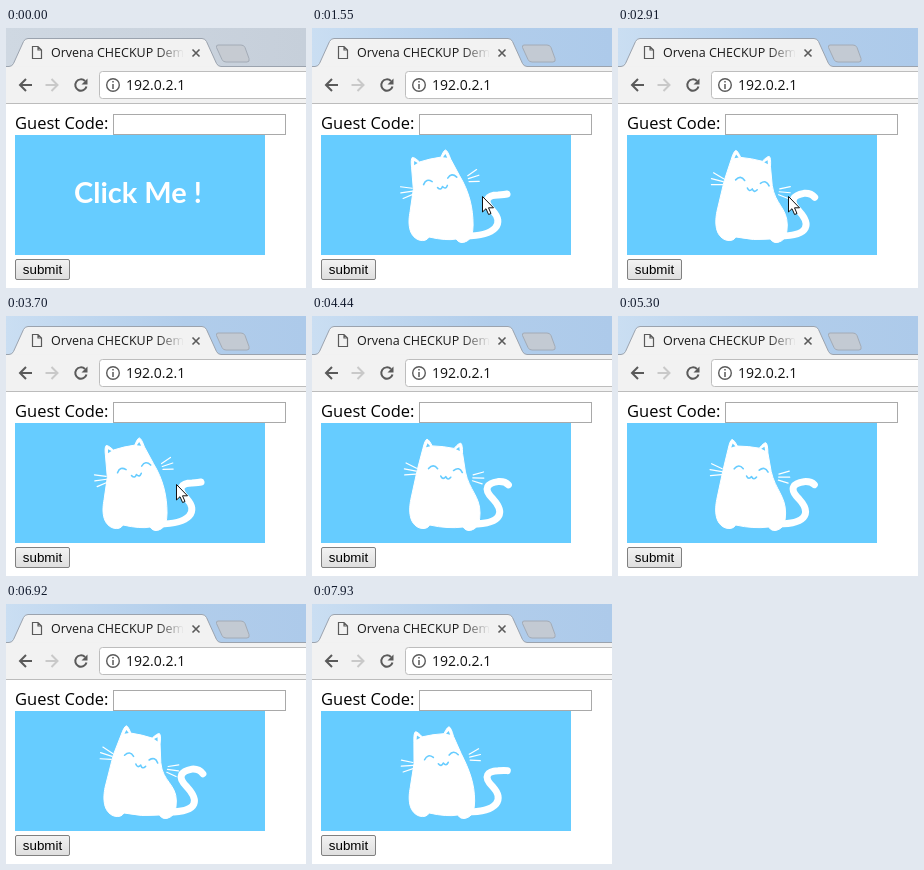
Recreate the animation shown at these times as an HTML page. Size 300x260 px, loop 8000 ms.

```html
<!DOCTYPE html>
<html lang="en">
<head>
<meta charset="utf-8">
<style>
html, body { margin: 0; width: 100%; height: 100%; overflow: hidden; background: #fff; }
svg { display: block; width: 300px; height: 260px; }
text { font-family: "Open Sans", "Noto Sans", sans-serif; }
.icon { fill: none; stroke: #5a5a5a; stroke-width: 2; }
</style>
</head>
<body>
<svg viewBox="0 0 300 260">
  <defs>
    <linearGradient id="idle"><stop stop-color="#cfd8e2"/><stop offset="1" stop-color="#c6cfda"/></linearGradient>
    <linearGradient id="active"><stop stop-color="#cadef2"/><stop offset=".6" stop-color="#b1cdeb"/><stop offset="1" stop-color="#adcaea"/></linearGradient>
    <linearGradient id="fade" gradientUnits="userSpaceOnUse" x1="150" x2="178">
      <stop stop-color="#1a1a1a"/><stop offset="1" stop-color="#1a1a1a" stop-opacity="0"/>
    </linearGradient>
    <linearGradient id="button" x2="0" y2="1">
      <stop stop-color="#f3f3f3"/><stop offset="1" stop-color="#dedede"/>
    </linearGradient>
  </defs>

  <!-- browser window -->
  <rect id="strip" width="300" height="39"/>
  <path id="plus" d="M212 17H235Q238 17 239 19.500L243 30.500Q244 34 241 34H220Q217 34 216 31.500L210.500 19.500Q210 17 212 17Z" stroke="#a3abb6"/>
  <rect y="38" width="300" height="38" fill="#f2f2f2"/>
  <path d="M0 38.500H3Q6 38.500 7.500 35.500L17.500 13.500Q19 10.500 22 10.500H196Q199 10.500 200.500 13.500L210.500 35.500Q212 38.500 215 38.500H300" fill="#f2f2f2" stroke="#9ba3ae"/>
  <path d="M0 75.500H300" stroke="#bcbcbc"/>
  <path class="icon" style="stroke-width:1.2" d="M26.500 18.500H32L35.500 22V30.500H26.500ZM32 18.500V22H35.500"/>
  <text x="45" y="29" font-size="12.500" fill="url(#fade)">Orvena CHECKUP Demo</text>
  <path class="icon" style="stroke-width:1.6" d="M186.500 21.500L193.500 28.500M193.500 21.500L186.500 28.500"/>
  <path class="icon" d="M26 57H14M20 51L14 57L20 63"/>
  <path class="icon" style="stroke:#c9c9c9" d="M39.500 57H51.500M45.500 51L51.500 57L45.500 63"/>
  <path class="icon" d="M79 53A5.700 5.700 0 1 0 80.500 58.500"/>
  <path d="M81.500 50.500V56.500H75.500Z" fill="#5a5a5a"/>
  <rect x="93.500" y="43.500" width="220" height="27" rx="3" fill="#fff" stroke="#bdbdbd"/>
  <circle class="icon" style="stroke-width:1.4" cx="107" cy="57" r="6.300"/>
  <path class="icon" style="stroke-width:1.5" d="M107 53V54.600M107 56V61"/>
  <text x="120" y="62" font-size="14" fill="#111">192.0.2.1</text>

  <!-- page -->
  <text x="9" y="101" font-size="16.500">Guest Code:</text>
  <rect x="107.500" y="86.500" width="172" height="20" fill="#fff" stroke="#a9a9a9"/>
  <rect x="9" y="107" width="250" height="120" fill="#6cf"/>
  <text id="prompt" x="132" y="175" text-anchor="middle" fill="#fff" style="font:bold 29px Lato,sans-serif">Click Me !</text>
  <g id="cat" fill="none" stroke-linecap="round" stroke-linejoin="round">
    <path id="tail" stroke="#fff" stroke-width="7"/>
    <path id="body" fill="#fff" stroke="#fff"/>
    <g id="face">
      <path stroke="#fff" stroke-width="1.200" d="M-24 2L-35 -2M-24 5L-36 4M-24 8L-35 10M33 2L43 -2M33 5L44 4M33 8L43 10"/>
      <path stroke="#6cf" stroke-width="1.600" d="M-12 1Q-8 -5 -3 0M13 0Q18 -5 22 1M1 7Q3.500 11 6 7Q8.500 11 11 7"/>
      <path fill="#6cf" d="M-16 -24L-17 -20L-13 -21.500ZM16 -24L17 -20L13 -21.500Z"/>
    </g>
  </g>
  <rect x="9.500" y="231.500" width="54" height="20" rx="1.500" fill="url(#button)" stroke="#808080"/>
  <text x="36.500" y="246" text-anchor="middle" style="font:13.333px 'Liberation Sans',Arial,sans-serif">submit</text>
  <path id="cursor" d="M.500 .500V16L4 12.700L6.600 18.500L9 17.500L6.500 11.800H11.500Z" fill="#fff" stroke="#111"/>
</svg>
<script>
const LOOP = 8000, CLICK = 1200, SWAY = 2250, LEFTMOST = 1480;
const $ = id => document.getElementById(id);
const clamp = v => Math.max(0, Math.min(1, v));
const mix = (a, b, k) => a + (b - a) * k;

// lean runs from -1 (left) to 1 (right)
function drawCat(lean) {
  const cx = 127 + 4 * lean, cy = 153, deg = 1 + 14 * lean;
  const a = deg * Math.PI / 180, cos = Math.cos(a), sin = Math.sin(a);
  // point of the tilted head, measured from its centre
  const h = (x, y) => `${cx + x * cos - y * sin} ${cy + x * sin + y * cos} `;
  const l = 97.5 + lean / 2, r = 166 + 5 * lean;
  $('face').setAttribute('transform', `translate(${cx} ${cy}) rotate(${deg})`);
  $('body').setAttribute('d',
    `M${h(-23, 3)}L${h(-20, -18)}Q${h(-19, -27)}${h(-17, -28)}Q${h(-15, -28)}${h(-11, -22)}` +
    `Q${h(0, -23)}${h(11, -22)}Q${h(15, -28)}${h(17, -28)}Q${h(19, -27)}${h(20, -18)}L${h(25, 0)}` +
    `C${h(31, 18)}${r} 180 ${r} 197Q${r} 210 ${r - 6} 213` +
    `Q${r - 13} 217 ${r - 17} 211Q${l + 38} 213 ${l + 20} 209` +
    `Q${l + 17} 214 ${l + 10} 212C${l - 1} 208 ${l - 1} 194 ${l + 1} 184Z`);
  const tipX = 196 + lean, tipY = 168 + 2 * lean;
  $('tail').setAttribute('d',
    `M${r - 8} 208C${r + 24} 208 192 195 181 183` +
    `C170 172 176 167 186 ${166 - lean}Q193 ${165.5 - lean} ${tipX} ${tipY}`);
}

function moveCursor(t) {
  const enter = 1 - (1 - clamp((Math.floor((t - 500) / 60) + 1) / 5)) ** 1.5;
  const leave = clamp((t - 3900) / 420) ** 2;
  const x = mix(318, 170, enter) + 12 * leave;
  const y = mix(203, 168, enter) + 95 * leave;
  $('cursor').setAttribute('transform', `translate(${x} ${y})`);
  $('cursor').style.display = t >= 500 && leave < 1 ? '' : 'none';
}

function draw(now) {
  const t = now % LOOP, on = t >= CLICK;
  $('strip').setAttribute('fill', on ? 'url(#active)' : 'url(#idle)');
  $('plus').setAttribute('fill', on ? '#c3cad3' : '#c6cbd2');
  $('prompt').style.display = on ? 'none' : '';
  $('cat').style.display = on ? '' : 'none';
  drawCat(-Math.cos((t - LEFTMOST) / SWAY * 2 * Math.PI));
  moveCursor(t);
  requestAnimationFrame(draw);
}
requestAnimationFrame(draw);
</script>
</body>
</html>
```
